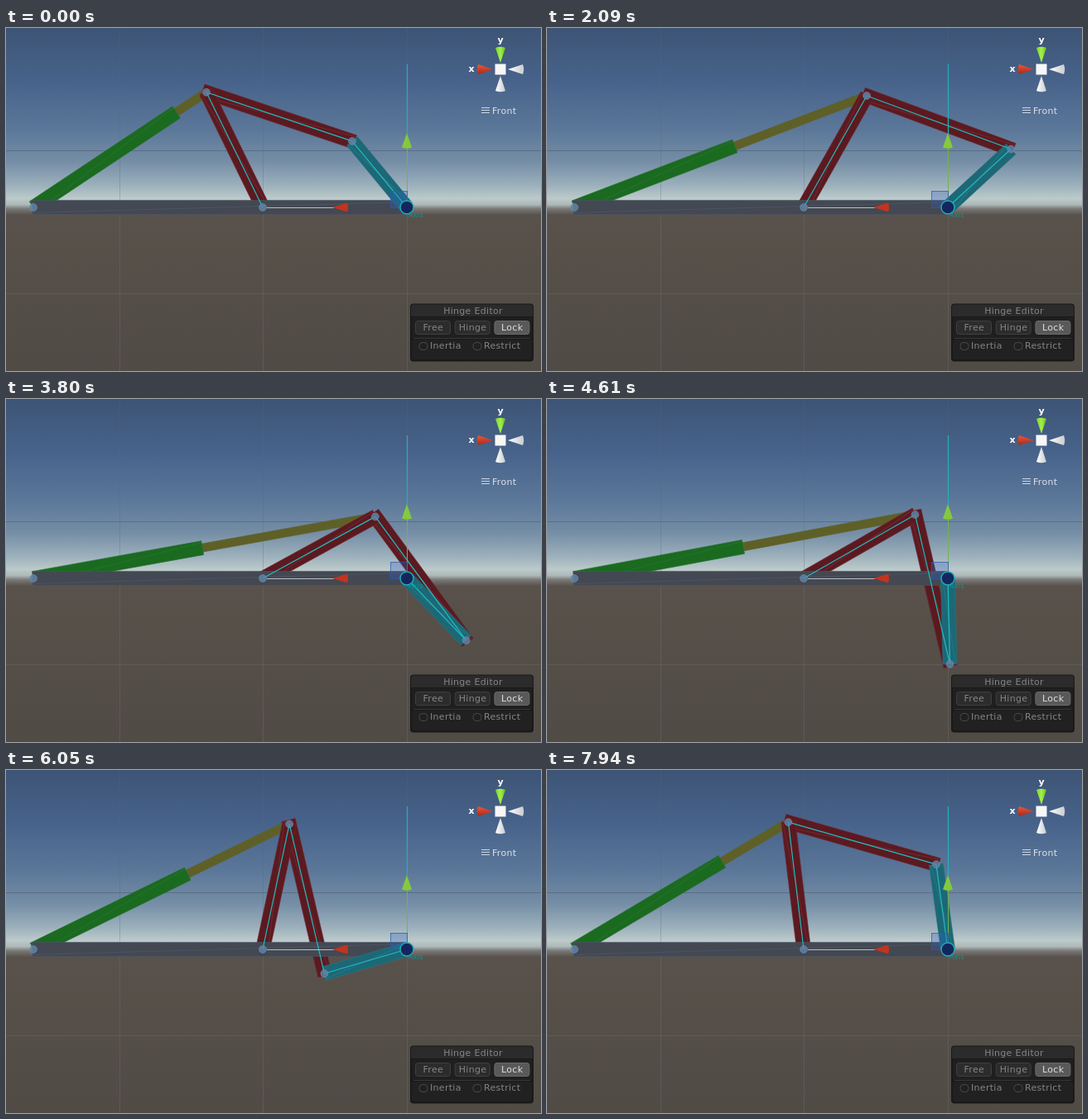
An HTML page that plays this animation: 646x415 px, repeating every 8000 ms.

```html
<!DOCTYPE html>
<html lang="en">
<head>
<meta charset="utf-8">
<title>Linkage</title>
<style>
html, body { margin: 0; width: 100%; height: 100%; overflow: hidden; background: #524c47; }
svg { display: block; width: 646px; height: 415px; }
text { font: 11px "DejaVu Sans", sans-serif; letter-spacing: .3px; }
.mid { text-anchor: middle; }
.axis { font-weight: bold; fill: #fff; letter-spacing: 0; }
.wire { stroke: #20bcc0; stroke-width: 1.2; }
.joint { fill: #5f83a4; fill-opacity: .85; stroke: #7796b4; stroke-opacity: .5; }
</style>
</head>
<body>
<svg viewBox="0 0 646 415">
  <defs>
    <linearGradient id="sky" x1="0" y1="0" x2="0" y2="415" gradientUnits="userSpaceOnUse">
      <stop offset="0" stop-color="#3d5475"/>
      <stop offset=".15" stop-color="#47628a"/>
      <stop offset=".29" stop-color="#5a7698"/>
      <stop offset=".39" stop-color="#758ea6"/>
      <stop offset=".46" stop-color="#9db1bc"/>
      <stop offset=".497" stop-color="#bccaca"/>
      <stop offset=".515" stop-color="#adb8b8"/>
      <stop offset=".527" stop-color="#797977"/>
      <stop offset=".545" stop-color="#59524c"/>
      <stop offset=".65" stop-color="#565049"/>
      <stop offset="1" stop-color="#514b46"/>
    </linearGradient>
    <linearGradient id="redCone" x2="0" y2="1"><stop stop-color="#f0553a"/><stop offset="1" stop-color="#a52a18"/></linearGradient>
    <linearGradient id="greenCone"><stop stop-color="#7fd52c"/><stop offset=".5" stop-color="#a2f04c"/><stop offset="1" stop-color="#6dba28"/></linearGradient>
    <linearGradient id="whiteCone"><stop stop-color="#fff"/><stop offset="1" stop-color="#c9ccd0"/></linearGradient>
  </defs>

  <rect width="646" height="415" fill="url(#sky)"/>
  <g stroke="#56677c" stroke-opacity=".5">
    <path d="M137.5 0V217M310.5 0V217M484.5 0V217" stroke-opacity=".3"/>
    <path d="M0 148.5H646" stroke-opacity=".8"/>
    <path d="M137.5 217V415M310.5 217V415M484.5 217V415M0 321.5H646" stroke="#6a6b6c" stroke-opacity=".45"/>
  </g>

  <g id="rig"></g>

  <g id="handles">
    <path d="M484.5 44V128" stroke="#22aeb8" stroke-width="1.3"/>
    <path d="M484.5 145V210" stroke="#74b348"/>
    <path d="M315 217.5H396" stroke="#b9bdc2"/>
    <rect x="464.5" y="197.5" width="20" height="20" fill="#2f5cc0" fill-opacity=".3" stroke="#2f58b0" stroke-opacity=".75"/>
    <path d="M394 217L412 211.5Q414 217 412 222.500Z" fill="#c23420"/>
    <path d="M484 127L490 144.500Q484 147 478 144.500Z" fill="#84c93c"/>
    <circle cx="484" cy="217" r="8" fill="#13275c" stroke="#22aeb8" stroke-width="1.4"/>
    <text x="486" y="229" fill="#119390" style="font-size:8px">Axis</text>
  </g>

  <g id="compass">
    <text class="axis mid" x="597" y="18">y</text>
    <text class="axis mid" x="562" y="53">x</text>
    <path d="M591 24Q597 21.500 603 24L597 42Z" fill="url(#greenCone)"/>
    <path d="M570 44Q567.500 50 570 56L588 50Z" fill="url(#redCone)"/>
    <path d="M624 44Q626.500 50 624 56L606 50Z" fill="url(#whiteCone)"/>
    <path d="M591 76Q597 78.500 603 76L597 58Z" fill="url(#whiteCone)"/>
    <rect x="590.5" y="43.500" width="13" height="13" fill="#f7f7f7"/>
    <path d="M574 96.500H584M574 99.500H584M574 102.500H584" stroke="#d0d7e0"/>
    <text x="587" y="104" fill="#dde2e9">Front</text>
  </g>

  <g id="panel">
    <rect x="488" y="333.500" width="149" height="70" rx="4" fill="#191919"/>
    <path d="M489 349V338Q489 334.500 492.500 334.500H632.500Q636 334.500 636 338V349Z" fill="#2b2b2b"/>
    <rect x="490" y="350" width="145" height="25" fill="#1f1f1f"/>
    <rect x="490" y="377" width="145" height="24" rx="2" fill="#212121"/>
    <path d="M492 375.500H633" stroke="#383838"/>
    <text class="mid" x="564" y="346" fill="#858585">Hinge Editor</text>
  </g>
</svg>
<script>
const NS = "http://www.w3.org/2000/svg";
const rig = document.getElementById("rig");
const panel = document.getElementById("panel");

function add(parent, tag, attrs, text) {
  const el = document.createElementNS(NS, tag);
  set(el, attrs);
  if (text) el.textContent = text;
  parent.appendChild(el);
  return el;
}
function set(el, attrs) {
  for (const key in attrs) el.setAttribute(key, attrs[key]);
}

// Panel controls
["Free", "Hinge", "Lock"].forEach((label, i) => {
  const on = i === 2, x = 494.5 + i * 47.7;
  add(panel, "rect", { x, y: 354.5, width: 42, height: 16, rx: 3,
    fill: on ? "#595959" : "#2c2c2c", stroke: on ? "#6a6a6a" : "#3f3f3f" });
  add(panel, "text", { class: "mid", x: x + 21.3, y: 366, fill: on ? "#dedede" : "#858585" }, label);
});
[["Inertia", 504], ["Restrict", 569]].forEach(([label, x]) => {
  add(panel, "rect", { x: x - 5, y: 380.5, width: 10, height: 9, rx: 4, fill: "#202020", stroke: "#484848" });
  add(panel, "text", { x: x + 8, y: 388, fill: "#858585" }, label);
});

// Linkage geometry
const base = { x: 33, y: 217 };
const pivot = { x: 310, y: 217 };
const motor = { x: 484, y: 217 };
const CRANK = 103.8, COUPLER = 185.7, ROCKER = 155, SLEEVE = 207.5;
const HOLD = 470, STEP = 90, LOOP = 8000;
const FIRST_ANGLE = 129.5, RUN_ANGLE = 131.94, TURN = 4.692;

function bar(fill, edge, width = 17) {
  const g = add(rig, "g", {});
  const body = add(g, "path", { fill, stroke: edge, "stroke-width": .6 });
  const seam = add(g, "path", { fill: "none", stroke: edge });
  return (a, b, before = 0, after = 0) => {
    const len = Math.hypot(b.x - a.x, b.y - a.y), h = width / 2;
    const turn = Math.atan2(b.y - a.y, b.x - a.x) * 180 / Math.PI;
    set(g, { transform: `translate(${a.x} ${a.y}) rotate(${turn})` });
    set(body, { d: `M${-before} ${-h}H${len + after}V${h}H${-before}Z` });
    set(seam, { d: `M${-before} ${h - 2}L${len + after} ${2 - h}` });
  };
}
function wire() {
  const el = add(rig, "line", { class: "wire" });
  return (a, b) => set(el, { x1: a.x, y1: a.y, x2: b.x, y2: b.y });
}
function joint() {
  const el = add(rig, "circle", { class: "joint", r: 4.5 });
  return p => set(el, { cx: p.x, cy: p.y });
}

const drawRod = bar("#5e6027", "#5e6027", 10);
const drawSleeve = bar("#1a6a20", "#26702f");
const drawCoupler = bar("#5b1a20", "#722730");
const drawRocker = bar("#5b1a20", "#722730");
const drawBase = bar("#434852", "#4a5464");
const drawCrank = bar("#1d6876", "#257584");
const wires = [wire(), wire(), wire()];
const joints = [joint(), joint(), joint(), joint()];

drawBase(base, motor, 1, 1);

// Upper meeting point of the rocker and coupler circles
function knee(tip) {
  const dx = tip.x - pivot.x, dy = tip.y - pivot.y, d = Math.hypot(dx, dy);
  const along = (ROCKER ** 2 - COUPLER ** 2 + d * d) / (2 * d);
  const off = Math.sqrt(Math.max(0, ROCKER ** 2 - along ** 2));
  return { x: pivot.x + (along * dx + off * dy) / d, y: pivot.y + (along * dy - off * dx) / d };
}

function render(time) {
  const t = time % LOOP;
  const step = t < HOLD ? 0 : Math.floor((t - HOLD) / STEP) + 1;
  const angle = (step ? RUN_ANGLE - TURN * step : FIRST_ANGLE) * Math.PI / 180;
  const tip = { x: motor.x + CRANK * Math.cos(angle), y: motor.y - CRANK * Math.sin(angle) };
  const top = knee(tip);
  const reach = SLEEVE / Math.hypot(top.x - base.x, top.y - base.y);
  const mouth = { x: base.x + (top.x - base.x) * reach, y: base.y + (top.y - base.y) * reach };

  drawRod(mouth, top);
  drawSleeve(base, mouth);
  drawCoupler(top, tip, 5, 3);
  drawRocker(pivot, top, 0, 1);
  drawCrank(motor, tip);
  wires[0](pivot, top);
  wires[1](top, tip);
  wires[2](tip, motor);
  [base, pivot, top, tip].forEach((p, i) => joints[i](p));
}

const start = performance.now();
function tick() {
  render(performance.now() - start);
  requestAnimationFrame(tick);
}
tick();
</script>
</body>
</html>
```
